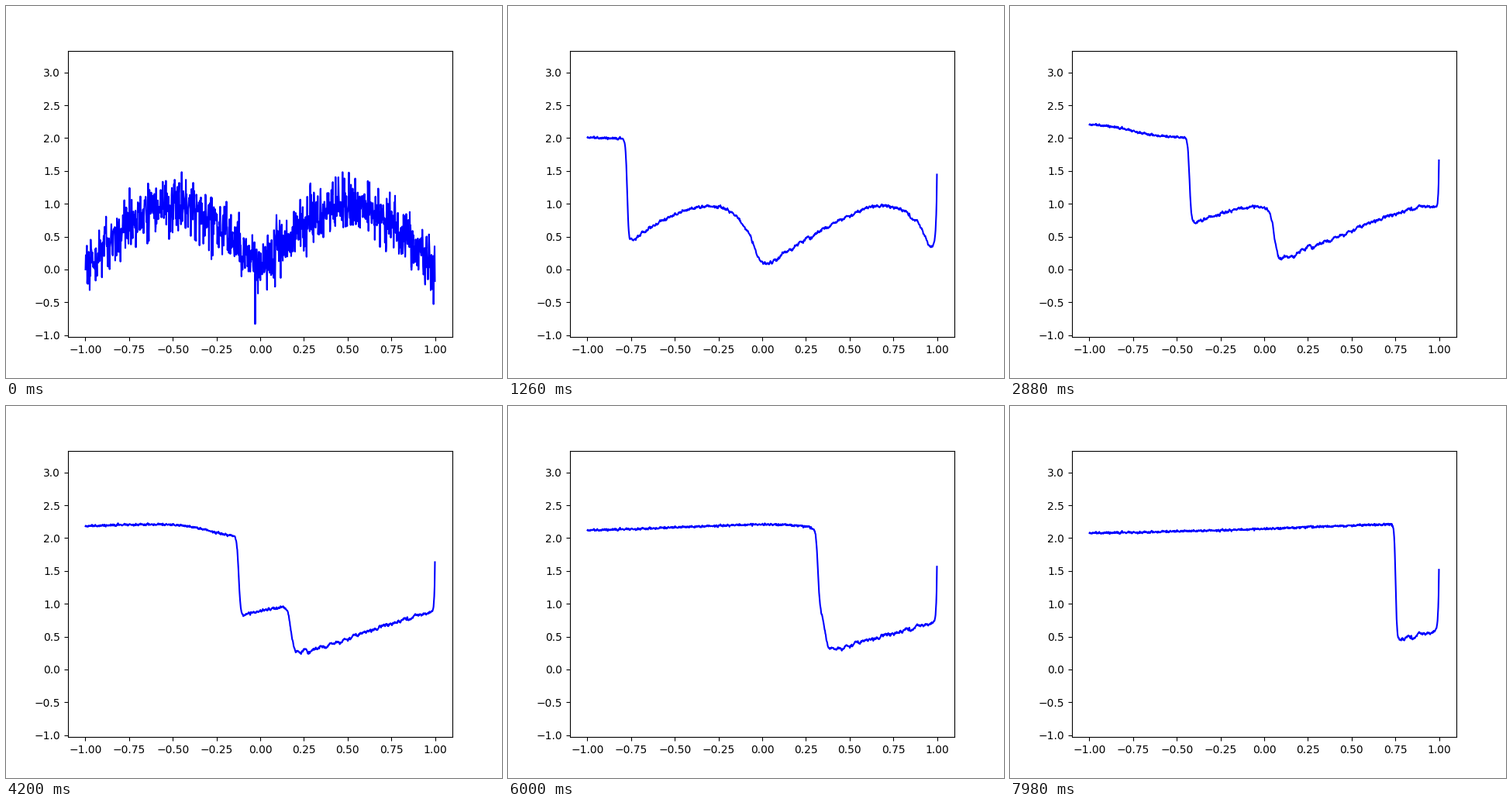
A matplotlib script for the animation above (8000 ms loop, 640x480 px).

```python
import numpy as np
import matplotlib.pyplot as plt
from matplotlib.animation import FuncAnimation

# Forced viscous Burgers equation on a periodic domain.
N = 1000
DX = 2 / N
NU = 0.0037
DT = 2.5e-4
SUBSTEPS = 40       # 0.01 time units per picture
PICTURES = 134
HOLD = 3            # ticks of 20 ms per picture
SEAM_PUSH = 1.98

rng = np.random.default_rng(12)
x = -1 + DX * (np.arange(N) + 0.5)


def initial_state():
    noise = rng.normal(0, 0.205, N)
    noise -= np.convolve(noise, np.full(60, 1 / 60), mode="same")
    u = 0.975 * np.abs(np.sin(np.pi * x)) + np.clip(noise, -0.65, 0.7)
    u[np.searchsorted(x, -0.03)] = -0.83    # lowest dip
    return u


def static_force():
    potential = rng.normal(0, 0.022, N)
    potential += 0.045 * np.exp(-((x - 0.265) / 0.005) ** 2 / 2)
    force = (potential - np.roll(potential, 1)) / DX
    # Strong push across the seam of the domain.
    force[0] += 0.75 * SEAM_PUSH / DX
    force[-1] += 0.25 * SEAM_PUSH / DX
    return force


def rate(u, force):
    v = np.concatenate((u[-1:], u, u[:1]))
    sq = v * v
    flux = (sq[1:] + sq[:-1]) / 4 - NU * np.diff(v) / DX
    return force - np.diff(flux) / DX


def simulate():
    u = initial_state()
    force = static_force()
    states = [u]
    for _ in range(PICTURES - 1):
        for _ in range(SUBSTEPS):
            u = u + DT * rate(u, force)
        states.append(u)
    return states


states = simulate()

fig, ax = plt.subplots(figsize=(6.4, 4.8), dpi=100)
ax.set_xlim(1.1 * x[0], 1.1 * x[-1])
ax.set_ylim(-1.029, 3.331)
line, = ax.plot(x, states[0], color="blue", lw=1.5)


def update(tick):
    line.set_ydata(states[tick // HOLD])
    return line,


anim = FuncAnimation(fig, update, frames=PICTURES * HOLD - 2, interval=20,
                     repeat=True, repeat_delay=0)
plt.show()
```
